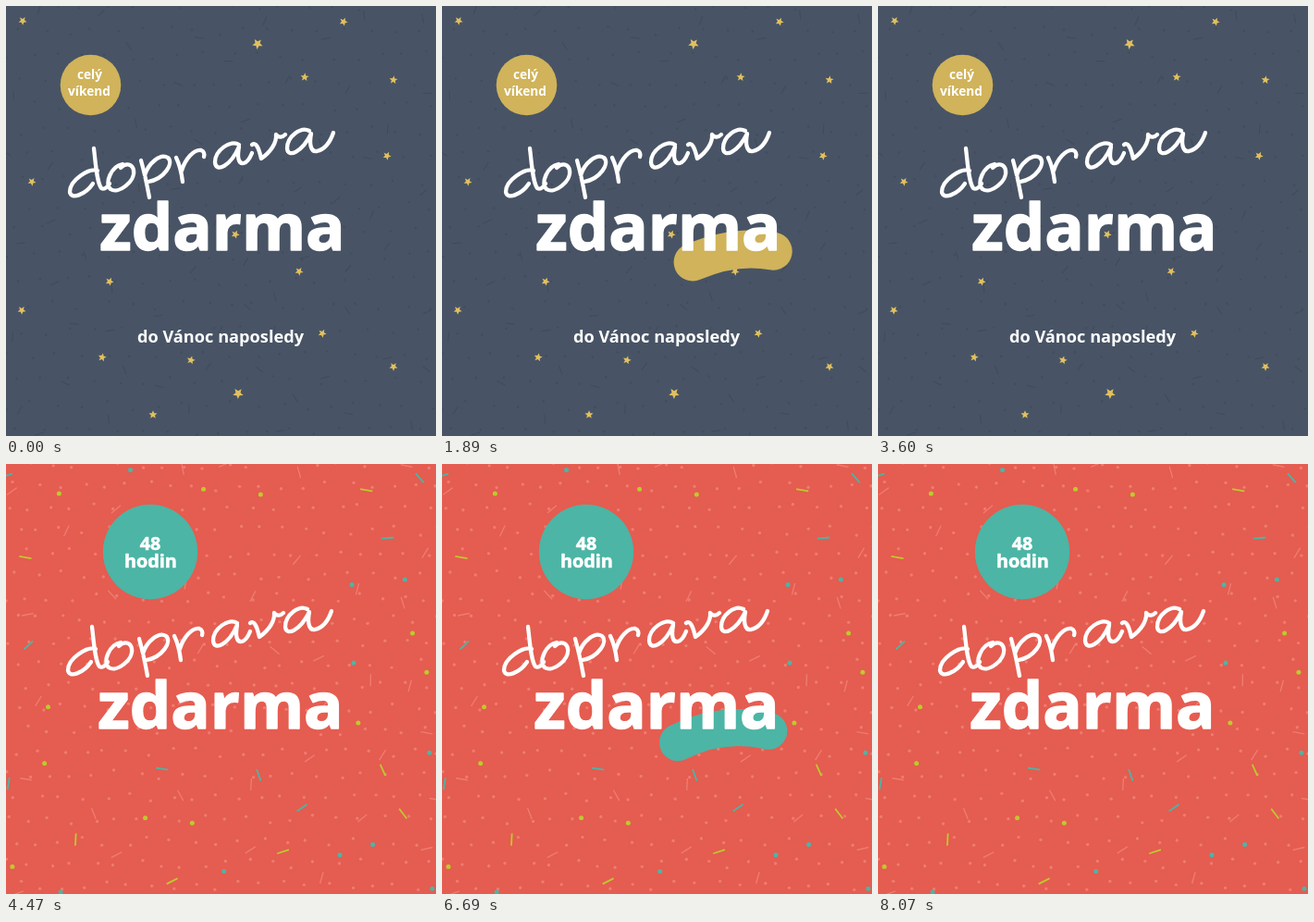
Animation of 465 by 465 pixels, one loop 8.97 s. Source, as an HTML page:

```html
<!DOCTYPE html>
<html lang="cs">
<head>
<meta charset="utf-8">
<title>Doprava zdarma</title>
<style>
  html, body { margin: 0; width: 100%; height: 100%; overflow: hidden; }
  svg { display: block; width: 100vw; height: 100vh; }
  text { font-family: "Open Sans", "Noto Sans", sans-serif; font-weight: 700; fill: #fff; text-anchor: middle; }
  .big, .round { stroke: #fff; stroke-width: 1.6; stroke-linejoin: round; }
  .big { font-size: 70.5px; }
  .round { font-size: 19.8px; stroke-width: .6; }
  .script, .swash { fill: none; stroke-linecap: round; stroke-linejoin: round; }
  .script { stroke: #fff; stroke-width: 4.3; }
</style>
</head>
<body>
<svg viewBox="0 0 465 465">
  <defs>
    <g id="title">
      <path class="script" d="
        M99 178C90 175 69 188 69 201C70 210 86 204 94 192M95 154C97 170 98 190 103 197C106 199 110 196 112 192
        M126 171C114 173 106 192 113 198C122 204 140 189 138 178C137 171 130 169 124 175
        M146 167C150 181 153 196 155 207M150 183C154 170 167 159 175 164C182 170 171 187 154 190
        M184 164C188 172 190 182 191 190M190 178C194 165 203 155 211 156C214 157 215 160 214 163
        M252 150C243 144 226 156 226 169C227 181 243 173 252 152C250 163 251 171 257 170C261 169 264 164 266 159
        M266 150C270 147 273 152 276 165C286 158 293 148 292 139C295 143 299 142 302 139
        M328 135C319 130 304 141 304 154C305 165 320 158 330 138C328 148 329 158 336 157C345 155 351 146 354 137"/>
      <text class="big" x="234" y="263.8">zdarma</text>
    </g>
  </defs>
  <g class="scene">
    <rect width="465" height="465" fill="#485465"/>
    <g id="night"></g>
    <path class="swash" pathLength="1" stroke="#d0b35a" stroke-width="41" d="M255.5 284.5Q318.7 251 375 269.5"/>
    <circle cx="91.5" cy="85.5" r="32.8" fill="#d0b35a"/>
    <text x="90.5" y="79" font-size="13.7">celý</text>
    <text x="90" y="96.5" font-size="13.7">víkend</text>
    <use href="#title"/>
    <text x="232" y="364" font-size="18.2">do Vánoc naposledy</text>
  </g>
  <g class="scene">
    <rect width="465" height="465" fill="#e55c50"/>
    <g id="party"></g>
    <path class="swash" pathLength="1" stroke="#4cb5a5" stroke-width="40" d="M244 307.2Q303 272.2 366 292.2"/>
    <circle cx="156" cy="95" r="51.2" fill="#4cb5a5"/>
    <text class="round" x="156" y="93.3">48</text>
    <text class="round" x="156.3" y="111.8">hodin</text>
    <use href="#title" x="-2" y="22"/>
  </g>
</svg>
<script>
const night = document.getElementById('night'), party = document.getElementById('party');
const SIZE = 465, TEAL = '#4cb5a5', LIME = '#bccb2b', PINK = '#ee7c71';

let seed = 7;
const rand = () => (seed = seed * 16807 % 2147483647) / 2147483647;

function add(parent, tag, attrs) {
  const el = document.createElementNS('http://www.w3.org/2000/svg', tag);
  for (const k in attrs) el.setAttribute(k, attrs[k]);
  parent.append(el);
}
const dot = (g, x, y, r, fill) => add(g, 'circle', { cx: x, cy: y, r, fill });
const dash = (g, x, y, half, stroke, width) => add(g, 'path', {
  d: `M${-half} 0H${half}`, stroke, 'stroke-width': width,
  transform: `translate(${x} ${y}) rotate(${rand() * 180})`
});
function star(x, y, r) {
  const points = Array.from({ length: 10 }, (_, i) => {
    const a = i * Math.PI / 5, q = i % 2 ? r * .45 : r;
    return [q * Math.sin(a), -q * Math.cos(a)];
  });
  add(night, 'polygon', { points: points.join(' '), fill: '#e2c05e', transform: `translate(${x} ${y}) rotate(${rand() * 40})` });
}

// Staggered, slightly uneven field of dots
function field(g, step, r, fill) {
  for (let row = 0; row * step < SIZE + 10; row++)
    for (let x = row % 2 * step / 2; x < SIZE + 5; x += step)
      dot(g, x + rand() * 10 - 5, row * step + rand() * 10 - 5, r, fill);
}

// Evenly spread random points: each is the loneliest of several candidates
function scatter(count, allowed = () => true) {
  const points = [];
  const gap = p => Math.min(SIZE, ...points.map(q => Math.hypot(p[0] - q[0], p[1] - q[1])));
  while (points.length < count) {
    const tries = Array.from({ length: 12 }, () => [rand() * SIZE, rand() * SIZE]).filter(allowed);
    if (tries.length) points.push(tries.reduce((a, b) => gap(b) > gap(a) ? b : a));
  }
  return points;
}
const offTitle = ([x, y]) => x < 55 || x > 370 || y < 40 || y > 320;

field(night, 27, 1.2, '#414d5e');
scatter(70).forEach(p => dash(night, ...p, 5, '#404b5c', 1.1));
[[18,16],[365,17],[272,41],[323,77],[419,80],[412,162],[28,190],[248,247],[317,287],[112,298],
 [17,329],[342,354],[104,380],[200,383],[419,390],[251,419],[159,442]]
  .forEach(([x, y], i) => star(x, y, i % 13 == 2 ? 6 : 4.7));

field(party, 24, 1.7, PINK);
scatter(40).forEach(p => dash(party, ...p, 6.5, PINK, 1.4));
scatter(36, offTitle).forEach((p, i) => {
  const color = i % 2 ? TEAL : LIME;
  if (i % 5 < 2) dash(party, ...p, 6.7, color, 1.8);
  else dot(party, ...p, 2.5, color);
});

const HALF = 4470, LOOP = 8970, SQUEEZE = .17;
const scenes = [...document.querySelectorAll('.scene')];
const swashes = [...document.querySelectorAll('.swash')];
const restEnd = [.967, .99];

function ease(t, from, to) {
  const p = Math.min(1, Math.max(0, (t - from) / (to - from)));
  return p * p * (3 - 2 * p);
}

// Visible part of the swash: draw, squeeze both ends, relax, wipe away
function span(t, rest) {
  if (t < 1650) return [0, ease(t, 0, 1020)];
  const shrink = ease(t, 1650, 1980), relax = ease(t, 1980, 2520), wipe = ease(t, 3210, 3600);
  const end = 1 - SQUEEZE * shrink + (rest - 1 + SQUEEZE) * relax;
  const start = SQUEEZE * (shrink - relax);
  return [start + (end - start) * wipe, end];
}

function draw() {
  const now = performance.now() % LOOP;
  const i = now < HALF ? 0 : 1;
  const [a, b] = span(now - i * HALF, restEnd[i]);
  scenes.forEach((s, k) => s.style.display = k == i ? '' : 'none');
  const style = swashes[i].style;
  style.visibility = b - a > .0001 ? 'visible' : 'hidden';
  style.strokeDasharray = `${Math.max(b - a, .0001)} 2`;
  style.strokeDashoffset = -a;
  requestAnimationFrame(draw);
}
draw();
</script>
</body>
</html>
```
